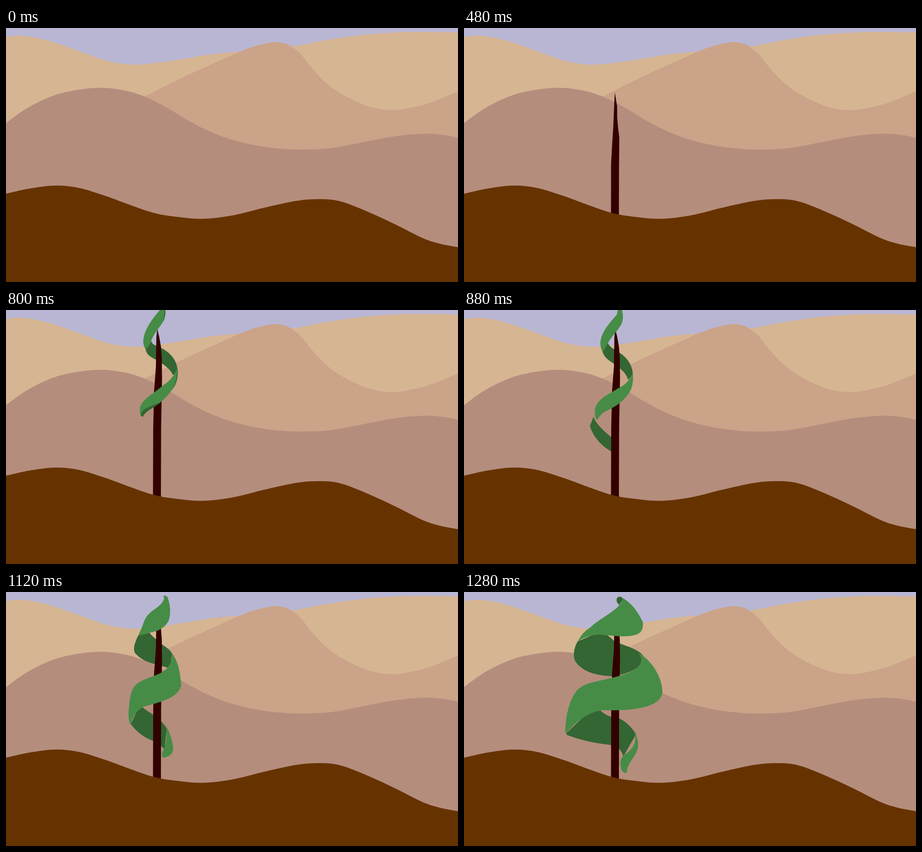
An HTML page with a canvas that plays this animation: 998 px wide and 561 px high, repeating every 1.76 s.

```html
<!DOCTYPE html>
<html lang="en">
<head>
<meta charset="utf-8">
<title>Ribbon tree in the dunes</title>
<style>
  html, body { margin: 0; width: 100%; height: 100%; overflow: hidden; }
  canvas { display: block; width: 998px; height: 561px; }
</style>
</head>
<body>
<canvas width="998" height="561"></canvas>
<script>
const ctx = document.querySelector('canvas').getContext('2d');
const W = 998, H = 561, STEP = 80, LOOP = 1760, LAST = 16;
const LIGHT = '#468c46', DARK = '#336633', BARK = '#330000';

// Smooth hill outline through [x, y] pairs, closed along the bottom edge.
function hill(...v) {
  const p = [];
  for (let i = 0; i < v.length; i += 2) p.push([v[i], v[i + 1]]);
  const path = new Path2D();
  path.moveTo(...p[0]);
  for (let i = 0; i < p.length - 1; i++) {
    const a = p[i - 1] || p[i], b = p[i], c = p[i + 1], d = p[i + 2] || c;
    path.bezierCurveTo(b[0] + (c[0] - a[0]) / 6, b[1] + (c[1] - a[1]) / 6,
      c[0] - (d[0] - b[0]) / 6, c[1] - (d[1] - b[1]) / 6, ...c);
  }
  path.lineTo(W, H);
  path.lineTo(p[0][0], H);
  return path;
}

const farDune = hill(0, 20, 40, 17.5, 100, 30, 183, 59, 225, 73, 278, 81, 340, 76, 400, 67,
  450, 58.5, 515, 52, 630, 41, 700, 28, 780, 16, 860, 10, 920, 8.5, 998, 10);
const peak = hill(250, 178, 305, 152, 350, 129, 410, 100, 470, 73, 515, 53, 550, 40, 590, 31.5,
  615, 34, 630, 41, 650, 57, 675, 88, 700, 115, 730, 139, 770, 161, 810, 176, 852, 181.5,
  890, 177, 940, 164, 998, 140);
const midDune = hill(0, 210, 45, 178, 100, 151, 150, 138, 208, 132, 262, 138, 305, 151, 350, 173,
  400, 203, 440, 224, 490, 244, 540, 257, 590, 265, 650, 268.5, 720, 265, 790, 252, 860, 239,
  922, 233.5, 965, 236, 998, 242.5);
const soil = hill(0, 366, 50, 355, 108, 348, 160, 353, 220, 371, 280, 393, 325, 408, 365, 415.5,
  432, 421.5, 500, 414, 570, 397, 640, 382, 690, 378, 735, 382, 790, 402, 860, 434, 920, 464,
  960, 477, 998, 484);

// Trunk shapes by step; the steps between are blended.
const trunks = [
  [1, 'M333 370L336 380L337 388L338 393L340 399L342 410L342 420L324.5 420L325 410L327 402L329 392L332 380Z'],
  [4, 'M334 210L337 238L337.5 265L339 285L342 306L342 360L342 420L324.5 420L324.5 340L328 322L329 300L332 225Z'],
  [8, 'M332 74L339 107L339 128L341 152L344 180L342.5 260L342 420L324.5 420L325 260L327 178L330 140L331.5 110Z'],
  [10, 'M334 42L338 58L342 80L344 105L344.5 150L342.5 260L342 420L324.5 420L325 260L327 178L331 125L332 60Z']
];

// Ribbon poses: front pieces (top, mid, tip), back pieces (upper, left, right), shaded edges.
const falling = {
  top: 'M346 -40L340 0C318 25 303 48 303 72Q304 80 308 87Q318 78 321 67C326 52 340 38 348 24Q353 14 352 0Q349 -40 346 -40Z',
  upper: 'M308 87L320 67Q322 76 332 79C355 88 378 105 379 135L369 144C363 130 348 120 332 110Q322 106 313 98Q309 92 308 87Z',
  mid: 'M378 128C381 150 374 170 363 181C352 196 335 210 318 220Q308 226 302 236Q294 234 296 215C302 195 328 184 346 167Q370 152 378 128Z',
  shade: 'M352 0Q352 14 346 27Q350 14 350 0ZM379 130Q381 155 370 172Q378 150 378 132ZM302 236Q306 226 316 221Q330 212 340 205Q322 210 308 218Q299 223 297 233Z'
};
const wound = {
  top: 'M337 18L333 30C318 46 297 60 297 83Q298 95 302 104Q304 90 315 79C325 70 340 60 346 47Q352 34 346 19Q341 15 337 18Z',
  upper: 'M302 104L310 75Q314 88 331 103C348 120 358 132 361 158L349 175C350 160 342 148 331 137Q318 127 310 116Q305 110 302 104Z',
  mid: 'M361 157C364 170 365 185 363 193C352 214 330 222 308 228Q286 236 278 258Q273 240 277 220C287 192 300 193 325 187Q356 180 361 157Z',
  left: 'M278 256L286 236Q292 254 324 280L334 288L334 318L324 312Q288 290 278 256Z',
  right: 'M340 293Q362 308 368 330L359 355Q355 334 340 323Z',
  tip: 'M366 324C371 340 370 360 368 377Q361 383 356 377C358 370 361 360 359 352C360 344 362 334 366 324Z',
  shade: 'M311 52Q320 38 335 29L331 36Q322 44 311 52ZM367 330Q371 345 370 356Q369 345 366 330Z'
};
const wider = {
  top: 'M348 8L349 15C342 36 317 38 306 62Q300 80 292 96Q304 93 317 90C338 87 354 76 360 61Q366 38 357 12Q353 7 348 8Z',
  upper: 'M292 96L317 90Q322 97 331 104C345 119 362 124 367 137L362 168C350 166 342 162 327 159Q300 152 285 135Q278 124 292 96Z',
  mid: 'M367 136C383 158 385 185 387 206C380 234 345 242 305 253Q282 264 275 293Q268 282 272 250C277 200 290 200 325 186Q368 172 367 136Z',
  left: 'M275 293L295 250Q310 262 325 271L334 278L334 333L325 329Q295 318 275 291Z',
  right: 'M336 280Q350 291 355 302L350 348Q346 342 336 336Z',
  tip: 'M354 298C362 310 370 335 369 350Q366 362 348 366C342 364 344 352 349 347C353 335 356 320 354 298Z'
};
const full = {
  top: 'M349 13L348 24C330 46 300 58 278 79Q262 88 251 109Q272 95 300 94C330 97 360 101 381 94Q397 88 395 67Q378 30 352 14Q350 13 349 13Z',
  upper: 'M251 109L300 88Q322 96 331 108C350 118 385 124 396 142L394 155C384 174 350 183 327 186Q265 184 245 152Q238 132 251 109Z',
  mid: 'M385 134C420 155 439 195 438 222C434 254 380 263 305 261Q260 268 226 312Q221 310 227 272C244 198 265 205 325 190Q412 170 385 134Z',
  left: 'M226 312L290 250Q306 270 325 276L334 280L334 341L325 338Q268 332 226 315Z',
  right: 'M336 276Q362 286 380 314L352 363Q348 350 336 340Z',
  tip: 'M376 309C402 355 360 368 360 398Q355 402 349 395C343 380 345 366 353 361C372 347 383 335 376 309Z',
  shade: 'M337 19A7 7 0 0 1 350 14Q350 22 341 31Q343 26 341 26Q337 24 337 19ZM384 133Q391 134 396 142Q390 136 384 133Z'
};

// Blend two paths that share the same commands.
function mix(a, b, t) {
  const to = b.match(/-?[\d.]+/g);
  let i = 0;
  return a.replace(/-?[\d.]+/g, n => +n + (to[i++] - n) * t);
}

function blend(a, b, t) {
  const pose = {};
  for (const k of ['top', 'upper', 'mid', 'left', 'right', 'tip'])
    if (a[k] && b[k]) pose[k] = mix(a[k], b[k], t);
  return pose;
}

const { left, right } = wound;
const ribbons = {
  7: { top: 'M322 0Q323 8 330 6Q340 4 347 0Z' },
  8: {
    top: 'M350 0C347 13 341 22 334 30C324 42 318 48 315 58Q311 61 308 58C304 38 308 20 326 0Z',
    shade: 'M307 50Q315 39 329 33Q318 45 315 58Q311 61 308 58ZM350 0Q348 12 339 23Q346 12 347 0Z'
  },
  9: { top: falling.top, upper: falling.upper },
  10: falling,
  11: { ...blend(falling, wound, 1 / 3), left },
  12: { ...blend(falling, wound, 2 / 3), left, right },
  13: wound,
  14: wider,
  15: blend(wider, full, 0.5),
  16: full
};

function trunkAt(step) {
  const next = trunks.findIndex(([s]) => s >= step);
  if (next < 0) return trunks[trunks.length - 1][1];
  if (next === 0) return trunks[0][1];
  const [s0, a] = trunks[next - 1], [s1, b] = trunks[next];
  return mix(a, b, (step - s0) / (s1 - s0));
}

function fill(color, ...paths) {
  ctx.fillStyle = color;
  for (const p of paths) if (p) ctx.fill(p instanceof Path2D ? p : new Path2D(p));
}

function draw(step) {
  ctx.fillStyle = '#b9b6d3';
  ctx.fillRect(0, 0, W, H);
  fill('#d6b592', farDune);
  fill('#cba388', peak);
  fill('#b58d7d', midDune);
  const r = ribbons[step] || {};
  fill(DARK, r.upper, r.left, r.right);
  if (step) fill(BARK, trunkAt(step));
  fill(LIGHT, r.top, r.mid, r.tip);
  fill(DARK, r.shade);
  fill('#663300', soil);
}

function tick() {
  draw(Math.min(LAST, Math.floor(performance.now() % LOOP / STEP)));
  requestAnimationFrame(tick);
}
tick();
</script>
</body>
</html>
```
